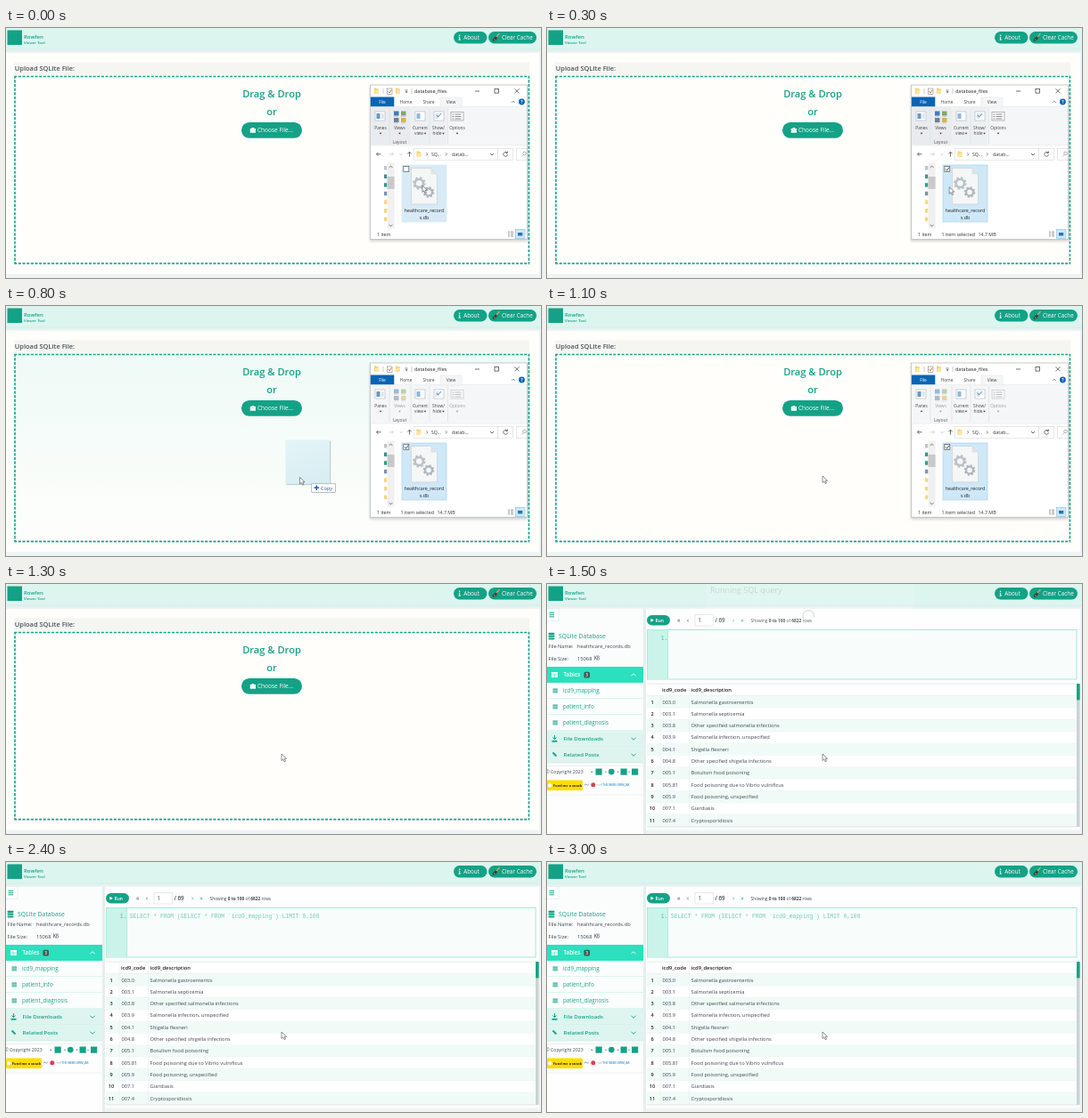
Animation of 600x281 px, one loop 3100 ms. Source, as an HTML page:

```html
<!DOCTYPE html>
<html lang="en">
<head>
<meta charset="utf-8">
<title>Database viewer demo</title>
<style>
html, body { margin: 0; width: 100%; height: 100%; overflow: hidden; background: #eef4f5; }
svg { display: block; width: 600px; height: 281px; font-family: "Open Sans", "Noto Sans", sans-serif; }
text { white-space: pre; }
.mono { font-family: "Liberation Mono", monospace; }
.cjk { font-family: "Noto Sans CJK JP", "Noto Sans CJK SC", "Noto Sans CJK", sans-serif; }
</style>
</head>
<body>
<svg id="stage" viewBox="0 0 600 281" xmlns="http://www.w3.org/2000/svg"></svg>
<script>
const LOOP = 3100, STEP = 100;
const TEAL = '#14a286', INK = '#3d4650', MINT = '#dcf5ef';

const box = (x, y, w, h, fill, more = '') =>
  `<rect x="${x}" y="${y}" width="${w}" height="${h}" fill="${fill}" ${more}/>`;
const line = (d, color, w = 0.7, more = '') =>
  `<path d="${d}" fill="none" stroke="${color}" stroke-width="${w}" ${more}/>`;
const shape = (d, fill, more = '') => `<path d="${d}" fill="${fill}" ${more}/>`;
const dot = (x, y, r, fill, more = '') => `<circle cx="${x}" cy="${y}" r="${r}" fill="${fill}" ${more}/>`;
const text = (x, y, size, str, fill = INK, weight = 400, more = '') =>
  `<text x="${x}" y="${y}" font-size="${size}" fill="${fill}" font-weight="${weight}" ${more}>${str}</text>`;
const mid = (x, y, size, str, fill, weight) => text(x, y, size, str, fill, weight, 'text-anchor="middle"');
const group = (id, body) => `<g id="${id}">${body}</g>`;
const chevron = (x, y, s, up, color, w) => {
  const d = up ? -s : s;
  return line(`M${x - s} ${y - d / 2}L${x} ${y + d / 2}L${x + s} ${y - d / 2}`, color, w);
};
const folder = (x, y) =>
  shape(`M${x} ${y}h2l.8 .8h2v5.6h-4.8z`, '#f4d070') + box(x + .8, y + 2, 4, 4.4, '#ffe69e');

function header() {
  return box(0, 0, 600, 281, '#eef4f5') + box(0, 0, 600, 24, MINT) +
    box(0, 23.5, 600, 4, 'url(#under)') +
    box(1.5, 2.5, 16.5, 16.5, TEAL) +
    text(20, 11.7, 6, 'Rowfen', TEAL, 600) +
    text(20, 17.8, 4.3, 'Viewer Tool', TEAL, 600) +
    box(502, 4, 37.5, 13.4, TEAL, 'rx="6.7"') +
    dot(508.6, 8.2, .8, '#fff') + line('M507.8 10.2h.9v3m-1.2 0h2.4', '#fff', .9) +
    text(513.3, 13.1, 6.25, 'About', '#fff', 500) +
    box(541, 4, 54, 13.4, TEAL, 'rx="6.7"') +
    line('M553.5 6.2L549.6 10.4', '#f0a35b', 1.2) +
    shape('M549.3 9.3l1.8 1.6l-2 3.5l-3.4 .3l.4-2.4z', '#33423d') +
    line('M547 12.4l2 1.6', '#e8c35a', .7) +
    text(556, 13.1, 6.3, 'Clear Cache', '#fff', 500);
}

function uploadPage() {
  return box(0, 28, 598, 248.5, '#fffefb') +
    box(9, 38.5, 578, 14.5, '#f5f5f2') +
    text(9.8, 47.7, 7.45, 'Upload SQLite File:', '#48525c', 600) +
    box(10, 54.5, 576.5, 210, 'url(#over)', 'id="glow"') +
    line('M9.2 54.5h578M9.2 264.6h578M10 53.7v211.6M586.4 53.7v211.6', TEAL, 1.6, 'stroke-dasharray="3.1 1.55"') +
    mid(298, 78, 11.1, 'Drag &amp; Drop', TEAL, 600) +
    mid(298, 98, 11.1, 'or', TEAL, 600) +
    box(264, 106, 68, 17.8, TEAL, 'rx="8.9"') +
    shape('M273.8 113h1.4l.7-1h2l.7 1h1.4v4.8h-6.2z', '#fff') + line('M274 114.8h6', '#9bd8ca', .5) +
    text(282, 117.3, 6.5, 'Choose File...', '#fff');
}

function gear(x, y, r, fill) {
  return dot(x, y, r, 'none', `stroke="${fill}" stroke-width="${r * .55}"`) +
    dot(x, y, r * 1.35, 'none', `stroke="${fill}" stroke-width="${r * .45}" stroke-dasharray="${r * .53}"`);
}

// Icon and caption of one ribbon command
function command(x, icon, first, second) {
  const ax = second ? x + 5.5 : x;
  return icon + mid(x, 113.5, 4.8, first, '#444') +
    (second ? mid(x - 1.5, 120.3, 4.8, second, '#444') : '') +
    shape(`M${ax - 1.3} 117.8h2.6l-1.3 1.6z`, '#333');
}

function explorer() {
  const gray = '#6b7278', dark = '#333';
  let s = box(408, 65.5, 177.5, 174.5, '#000', 'opacity=".16" filter="url(#soft)"') +
    box(408.5, 64, 176, 173.5, '#fff', 'stroke="#b4b9ba" stroke-width=".7"');
  // title bar
  s += folder(413, 67.5) + line('M423 68v6', '#aaa', .6) +
    box(427.5, 68, 5.5, 6.5, '#fff', 'stroke="#888" stroke-width=".6"') + line('M428.5 71l1.5 2l2.4-3.6', '#d0533c', .8) +
    folder(437, 67.5) + line('M447.5 70h3', dark, .6) + shape('M447.6 71.5h3l-1.5 1.6z', dark) +
    line('M455 68v6', '#aaa', .6) + text(458, 73.2, 5.5, 'database_files', '#222') +
    line('M526 71h5', dark) + box(548, 68.5, 4.6, 4.6, 'none', `stroke="${dark}" stroke-width=".7"`) +
    line('M570.5 68.3l5 5m0-5l-5 5', dark);
  // tabs
  s += box(408.9, 77.5, 26.4, 11, '#0a64b4') + mid(422, 85, 4.9, 'File', '#fff') +
    mid(448.5, 85, 4.9, 'Home', '#444') + mid(474, 85, 4.9, 'Share', '#444') +
    box(408.9, 88.5, 175.2, 43.5, '#f5f6f7') +
    box(487, 78, 24, 11, '#f5f6f7', 'stroke="#dde0e2" stroke-width=".5"') + mid(499, 85, 4.9, 'View', '#444') +
    line('M435 88.5h52M511 88.5h73M409 132h175', '#dde0e2', .5) +
    chevron(569, 83, 2, true, '#777', .7) + dot(578.4, 83, 3.4, '#0a64b4') + mid(578.4, 85, 5, '?', '#fff', 700);
  // ribbon
  const tile = (x, c) => box(x, 94, 11, 10, '#fff', 'stroke="#a7b4bf" stroke-width=".6"') + box(x + 1.5, 96, 4, 6, c);
  const views = [[435, 93.5, '#3f7fb7'], [443, 93.5, '#85a66a'], [435, 101, '#6d8192'], [443, 101, '#d6b255']]
    .map(([x, y, c]) => box(x, y, 5.5, 5, c) + line(`M${x} ${y + 6}h5`, '#aaa', .5)).join('');
  const options = box(499, 94.5, 14, 9.5, '#fff', 'stroke="#888" stroke-width=".6"') +
    line('M500.5 97h2m1 0h7M500.5 99.5h2m1 0h7M500.5 102h2m1 0h7', '#667', .8);
  s += group('shade', box(409, 89, 44, 42.6, '#e9ecef') + box(455, 89, 39.5, 42.6, '#edf0f2')) +
    line('M430 90v40M454 90v40M475 90v40M495.5 90v40', '#d9dcdf', .6) +
    command(420, tile(414, '#6797c8') + box(421, 96, 2.6, 6, '#dbe5ee'), 'Panes') +
    command(464.5, tile(459, '#8db8de'), 'Current', 'view') +
    command(485, tile(480, '#d7e5f0') + line('M483 98l1.5 2l3.6-4', '#3978b0', .9), 'Show/', 'hide') +
    group('layout', command(441.5, views, 'Views') + command(506, options, 'Options')) +
    mid(441.5, 129.5, 4.9, 'Layout', '#555');
  // address row
  s += line('M420.5 141.8h-5m2-2l-2 2l2 2', dark) + line('M429.5 141.8h5m-2-2l2 2l-2 2', '#c8c8c8') +
    chevron(443, 142, 1.2, false, '#999', .6) + line('M452.5 144.6v-5.4m-2.2 2.2l2.2-2.2l2.2 2.2', dark) +
    box(457.5, 135.5, 94, 13, '#fff', 'stroke="#d7d9db" stroke-width=".6"') + folder(460.5, 138.5) +
    line('M471.3 140.3l1.5 1.6l-1.5 1.6M493 140.3l1.5 1.6l-1.5 1.6', dark, .6) +
    text(477, 144, 5.2, 'SQ...', dark) + text(500, 144, 5.4, 'datab...', dark) +
    chevron(545, 142, 1.9, false, dark, .8) + box(551.5, 135.5, 17, 13, '#fff', 'stroke="#d7d9db" stroke-width=".6"') +
    line('M562 140.2a2.4 2.4 0 1 0 .6 2.2M562.4 138.5v2h-2', dark, .7) +
    line('M584 135.5h-11.5v13H584', '#d7d9db', .6) +
    dot(581.5, 141, 1.8, 'none', 'stroke="#999" stroke-width=".7"') + line('M580.3 142.4l-2 2', '#999');
  // navigation pane
  ['#bcc6ce', '#3f8f9b', '#25a18f', '#7795ac', '#f6d67e', '#f6d67e', '#f6d67e'].forEach((c, i) => {
    s += box(424, 155 + i * 9.6, 3.4, 4.5, c);
  });
  s += box(427.6, 151.5, 8, 74, '#f0f0f0') + box(427.6, 167, 8, 14, '#c9c9c9') +
    chevron(431.5, 156, 1.9, true, '#555', .8) + chevron(431.5, 222, 1.9, false, '#555', .8) +
    line('M439 151v74', '#ececec', .5);
  // file tile
  s += box(444, 154, 50, 64, '#d8eaf6', 'id="tile" stroke-width=".7"') +
    shape('M454.5 157.5h22l7 7v33.5h-29z', '#f5f6f6', 'stroke="#c5cbcf" stroke-width=".6"') +
    shape('M476.5 157.5v7h7z', '#dfe3e5') + gear(463.3, 174.5, 4.6, '#bac2c6') + gear(474, 184.5, 4, '#abb5ba') +
    mid(469, 207.2, 5.3, 'healthcare_record', '#222') + mid(469, 215, 5.3, 's.db', '#222') +
    box(445.8, 155.6, 6, 6, '#fff', 'stroke="#555" stroke-width=".7"') +
    group('check', line('M447 158.6l1.5 1.7l2.5-3.6', '#222', .8));
  // status bar
  s += text(416, 234, 5.3, '1 item', dark) +
    group('picked', text(442.6, 234, 5.3, '1 item selected', dark) + text(483.5, 234, 5.3, '14.7 MB', dark)) +
    line('M563 229.4h2m1 0h3M563 231.6h2m1 0h3M563 233.8h2m1 0h3', gray, .8) +
    box(571.5, 226.5, 10.5, 10, '#cce8fa', 'stroke="#82bfe4" stroke-width=".6"') + box(574, 230, 5.2, 3.5, '#2875a8');
  return s;
}

function sidebar() {
  let s = box(0, 28, 108, 253, '#fdfefd') + box(0, 28, 108, 66, '#fafdfc') +
    box(0, 27.5, 13, 14, '#fff', 'stroke="#d3ece6" stroke-width=".6"') +
    line('M2.5 32.4h5.5M2.5 34.6h5.5M2.5 36.8h5.5', TEAL, 1);
  [54.8, 57.6, 60.4].forEach(y => { s += box(1.5, y, 7, 2.2, TEAL, 'rx="1"'); });
  s += text(13, 60.5, 6.9, 'SQLite Database', TEAL, 500) +
    text(1.6, 72.4, 5.7, 'File Name:', INK, 500) + text(34, 72.4, 5.75, 'healthcare_records.db') +
    text(1.6, 85.5, 5.7, 'File Size:', INK, 500) + text(34, 85.5, 5.75, '15068') +
    text(53, 85.4, 6, '㎅', INK, 500, 'class="cjk"');
  s += box(0, 93, 108, 18, '#2be0bd') + box(5, 99, 7, 6, '#fff') + line('M5 101.3h7M5 103.3h7M8.4 101v4', '#2be0bd', .5) +
    text(18.6, 104.2, 6.2, 'Tables', '#fff', 600) + box(41.5, 98.7, 6.5, 6.8, '#3b5853', 'rx="1.5"') +
    mid(44.7, 104, 4.8, '3', '#fff', 600) + chevron(97, 102, 2.5, true, '#fff', .9);
  ['icd9_mapping', 'patient_info', 'patient_diagnosis'].forEach((name, i) => {
    const y = 111 + i * 18;
    s += box(0, y, 108, 18, '#fbfefd') + line(`M0 ${y + 18}h108`, '#8fe3d0', .6) +
      box(6.5, y + 6.4, 5.5, 5, '#4fb9a4') + line(`M6.5 ${y + 8.2}h5.5M6.5 ${y + 9.8}h5.5`, '#d6f1ea', .5) +
      text(18, y + 11, 6.25, name, TEAL);
  });
  ['File Downloads', 'Related Posts'].forEach((name, i) => {
    const y = 165 + i * 18;
    s += box(0, y, 108, 18, '#def5ef') + line(`M0 ${y + 18}h108`, '#bfeade', .6) +
      text(18.6, y + 11, 6.1, name, TEAL, 600) + chevron(97, y + 9, 2.5, false, TEAL, .9);
  });
  s += line('M8.5 170v4.5m-2-2l2 2l2-2', TEAL, 1) + line('M5.5 176.8h6', TEAL, 1.8) +
    line('M6.5 189.5l4 4', TEAL, 1.8) +
    line('M0 204.5h108M0 237h108', '#dfe6e4', .6) +
    text(-1.6, 213, 5.2, '© Copyright 2023') + dot(50.2, 211.2, .7, INK) + dot(66, 211.2, .6, INK) +
    dot(79.6, 211.2, .6, INK) + dot(92, 211.2, .6, INK);
  s += box(54.5, 207.5, 7.2, 7.2, TEAL) + dot(72.3, 211.1, 3.3, TEAL) +
    box(82.5, 207.5, 7.2, 7.2, TEAL) + box(95, 207.5, 7.2, 7.2, TEAL);
  s += box(-2, 220.5, 42, 11.5, '#ffdd00', 'rx="1.5"') + dot(3.2, 226.2, 2.2, '#fff') +
    text(7, 227.8, 3.85, 'Fund me a snack', '#222', 700) +
    line('M42 226l2-1.2l1.4 1.6l1.6-1.8', '#4a9bd6', .8) + dot(51.8, 225.8, 2.5, '#e23b4e') +
    text(56.5, 227, 3.2, '•–•) THE WEBS OWN JAR', '#368ed0', 600);
  return s + box(108, 28, 3, 253, '#e6eeec');
}

function results() {
  const rows = [['003.0', 'Salmonella gastroenteritis'], ['003.1', 'Salmonella septicemia'],
    ['003.8', 'Other specified salmonella infections'], ['003.9', 'Salmonella infection, unspecified'],
    ['004.1', 'Shigella flexneri'], ['004.8', 'Other specified shigella infections'],
    ['005.1', 'Botulism food poisoning'], ['005.81', 'Food poisoning due to Vibrio vulnificus'],
    ['005.9', 'Food poisoning, unspecified'], ['007.1', 'Giardiasis'], ['007.4', 'Cryptosporidiosis']];
  let s = box(111, 28, 487, 248.5, '#fdfefd') +
    box(112, 35, 26, 11.5, TEAL, 'rx="5.7"') + shape('M116.4 38.8l3.4 2l-3.4 2z', '#fff') +
    text(121.5, 42.6, 4.9, 'Run', '#fff', 600) +
    mid(147.7, 43, 6.8, '«', INK) + mid(158, 43, 6.8, '‹', INK) +
    box(166, 34.5, 20.5, 12.5, '#fff', 'stroke="#dbe2e0" stroke-width=".7"') + text(169.5, 43.1, 6.2, '1') +
    text(188.4, 43.1, 6.3, '/ 69', INK, 600) + mid(209, 43, 6.8, '›', TEAL) + mid(219, 43, 6.8, '»', TEAL) +
    text(228.6, 42.8, 4.8, 'Showing <tspan font-weight="700">0 to 100</tspan> of <tspan font-weight="700">6822</tspan> rows');
  s += box(112.4, 51.4, 481.6, 55.6, '#f8fdfc', 'stroke="#8ee4d0" stroke-width=".8"') +
    box(112.8, 51.8, 22.6, 54.8, '#caf3e9') + line('M135.6 51.8v54.8', '#8ee4d0', .7) +
    text(127.8, 62.7, 6.33, '1.', '#58b8a5', 400, 'class="mono"') +
    group('query', text(138.8, 62.7, 6.33, 'SELECT * FROM (SELECT * FROM `icd9_mapping`) LIMIT 0,100', '#74c8b6', 400, 'class="mono"'));
  s += box(112, 112, 482, 13.8, '#fff') + line('M112 112.2h482M112 125.8h482', '#d5dedb', .6) +
    text(129, 121.3, 5.8, 'icd9_code', '#222', 600) + text(161.6, 121.3, 5.8, 'icd9_description', '#222', 600);
  rows.forEach(([code, name], i) => {
    const y = 125.9 + i * 13.32;
    s += box(112, y, 482, 13.32, i % 2 ? '#fff' : '#f0fbf8') + line(`M112 ${y + 13.32}h482`, '#dbe7e4', .5) +
      mid(118, y + 8.6, 5.6, i + 1, '#222', 600) + text(129.4, y + 8.6, 5.75, code) + text(161.6, y + 8.6, 5.75, name);
  });
  return s + line('M127 112v160.4M159.5 112v160.4', '#e3ecea', .5) +
    box(594, 112, 3.6, 161, '#cbd3d1') + box(594, 112, 3.6, 18.5, TEAL, 'rx=".8"') +
    line('M112 273h482', '#d5dedb', .6);
}

const ghost = box(-15, -41, 49.7, 49.7, '#8ea3aa', 'opacity=".5"') +
  box(-16, -42, 49.5, 49.5, 'url(#ghostFill)') +
  box(13.3, 7.3, 26.5, 9.5, '#fff', 'stroke="#8b959a" stroke-width=".6"') +
  line('M18.8 9v5.6M16 11.8h5.6', '#2a5bb0', 1.5) + text(23.5, 14, 5.6, 'Copy', '#2a4f96');

const stage = document.getElementById('stage');
stage.innerHTML = `<defs>
  <linearGradient id="under" x2="0" y2="1"><stop stop-color="#d6eee9"/><stop offset="1" stop-color="#eef4f5"/></linearGradient>
  <linearGradient id="over" x2="0" y2="1"><stop stop-color="#eefaf7"/><stop offset="1" stop-color="#fefefb"/></linearGradient>
  <linearGradient id="ghostFill" x2=".4" y2="1"><stop stop-color="#e4f4f7"/><stop offset="1" stop-color="#d9eef3"/></linearGradient>
  <filter id="soft"><feGaussianBlur stdDeviation="1.8"/></filter></defs>` +
  header() + group('upload', uploadPage() + group('files', explorer())) +
  group('database', sidebar() + results()) +
  group('notice', box(178, -6, 234, 67, '#fff', 'opacity=".5"') +
    text(183, 9.5, 9, 'Running SQL query', '#7d9691') +
    line('M288 39.5a6.3 6.3 0 1 1 11.4-2.4', '#8b9c99', 1.2)) +
  group('pointer', group('ghost', ghost) +
    shape('M0 0v7.5l1.8-1.6l1.3 2.8l1.4-.6l-1.3-2.8h2.4z', '#fff', 'stroke="#444" stroke-width=".6"'));

const el = id => document.getElementById(id);
const [upload, files, database, notice, pointer, drag, query, check, picked, glow, tile, shade, layout] =
  ['upload', 'files', 'database', 'notice', 'pointer', 'ghost', 'query', 'check', 'picked', 'glow', 'tile', 'shade', 'layout'].map(el);
const show = (node, on) => node.setAttribute('display', on ? 'inline' : 'none');

// time, x, y of the pointer tip
const path = [[0, 467, 177], [200, 467, 177], [600, 403.5, 184], [800, 329.5, 192.5], [1000, 309, 191], [LOOP, 309, 191]];

function tip(t) {
  const i = path.findIndex(p => p[0] > t);
  const [t0, x0, y0] = path[i - 1], [t1, x1, y1] = path[i];
  const k = (t - t0) / (t1 - t0);
  return [x0 + (x1 - x0) * k, y0 + (y1 - y0) * k];
}

function draw(t) {
  const loaded = t >= 1400, selected = t >= 300, dragged = t >= 700, dragging = dragged && t < 1000;
  show(upload, !loaded);
  show(files, t < 1200);
  show(database, loaded);
  show(query, t >= 1600);
  show(check, selected);
  show(picked, selected);
  show(drag, dragging);
  show(shade, !dragged);
  show(notice, loaded && t < 1600);
  layout.setAttribute('opacity', dragged ? 0.5 : 1);
  notice.setAttribute('opacity', t < 1500 ? 0.65 : 0.3);
  notice.setAttribute('transform', `translate(0 ${t < 1500 ? 9 : 0})`);
  glow.setAttribute('opacity', dragging ? 1 : 0);
  tile.setAttribute('fill', selected ? '#cfe8f8' : '#d8eaf6');
  tile.setAttribute('stroke', selected ? '#a5d3f0' : '#d8eaf6');
  pointer.setAttribute('transform', `translate(${tip(t)})`);
}

function tick() {
  draw(Math.floor(performance.now() % LOOP / STEP) * STEP);
  requestAnimationFrame(tick);
}
tick();
</script>
</body>
</html>
```
